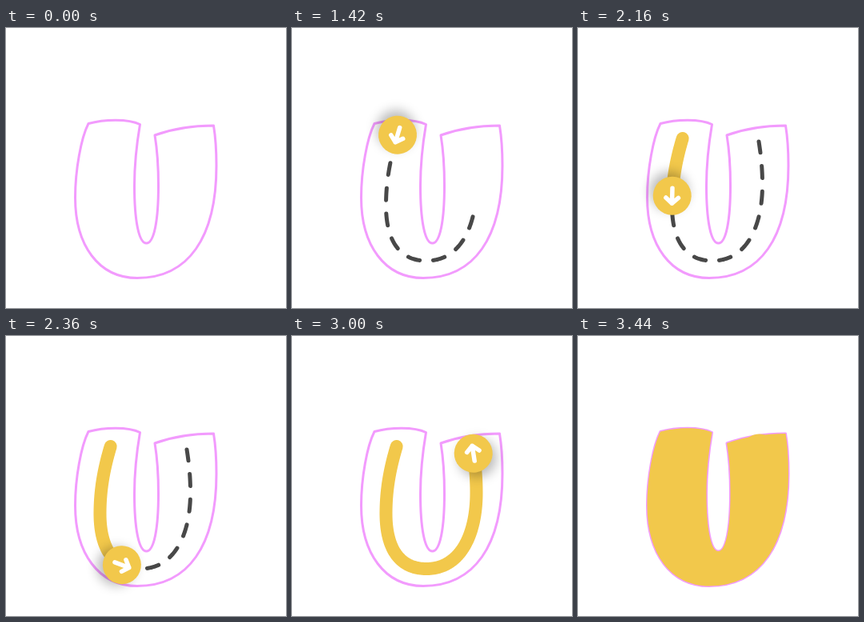
Animation of 350 by 350 pixels, one loop 4.8 s. Source, as an HTML page with a canvas:

```html
<!DOCTYPE html>
<html lang="en">
<head>
<meta charset="utf-8">
<title>Trace the letter u</title>
<style>
  html, body { margin: 0; width: 100%; height: 100%; overflow: hidden; background: #fff; }
  canvas { display: block; width: 350px; height: 350px; }
</style>
</head>
<body>
<canvas id="stage"></canvas>
<script>
const SIZE = 350, LOOP = 4800;
const PINK = '#f29bfd', GOLD = '#f2c84b', DARK = '#484848';

const canvas = document.getElementById('stage');
const ctx = canvas.getContext('2d');
const dpr = window.devicePixelRatio || 1;
canvas.width = canvas.height = SIZE * dpr;

const letter = new Path2D(
  'M103 119.5 C122 114 153 113 167.5 120.5 ' +
  'C163 147 160.5 170 160.5 197 C160.5 241 166 269 175.5 269 ' +
  'C185 269 190.5 241 190.5 197 C190.5 172 189.5 155 186 134 ' +
  'C208 126 234 122 259.5 122 C262 137 263 153 263 172 ' +
  'C263 262 228 312.5 164 312.5 C116 312.5 86.5 272 86.5 212 ' +
  'C86.5 177 94 137 103 119.5 Z');

// Centre line of the letter, measured in units of 1/366 of its length
const UNITS = 366;
const guide = document.createElementNS('http://www.w3.org/2000/svg', 'path');
guide.setAttribute('d',
  'M130.7 138 C122 167 117.5 193 117.5 222 C117.5 265 134 291 168 291 ' +
  'C210 291 230.5 249 230.5 196 C230.5 174 228.5 158 226 142');
const unit = guide.getTotalLength() / UNITS;
const points = Array.from({ length: UNITS + 1 }, (_, i) => guide.getPointAtLength(i * unit));

const clamp = (v, lo = 0, hi = 1) => Math.min(hi, Math.max(lo, v));
const progress = (t, start, span) => clamp((t - start) / span);
const ease = u => (1 - Math.cos(Math.PI * u)) / 2;

function pointAt(s) {
  const i = Math.min(Math.floor(s), UNITS - 1), f = s - i;
  const a = points[i], b = points[i + 1];
  return {
    x: a.x + (b.x - a.x) * f,
    y: a.y + (b.y - a.y) * f,
    angle: Math.atan2(b.y - a.y, b.x - a.x)
  };
}

function strokePart(from, to, width, color) {
  ctx.beginPath();
  const start = pointAt(from), end = pointAt(to);
  ctx.moveTo(start.x, start.y);
  for (let i = Math.floor(from) + 1; i < to; i++) ctx.lineTo(points[i].x, points[i].y);
  ctx.lineTo(end.x, end.y);
  ctx.lineWidth = width;
  ctx.strokeStyle = color;
  ctx.stroke();
}

function drawDashes(reach) {
  for (let s = 0; s < reach; s += 32) strokePart(s, Math.min(s + 15, reach), 5, DARK);
}

function drawBall(s, alpha, shade) {
  const p = pointAt(s), lag = 4.5;
  const turn = p.angle + Math.PI / 2;
  const cos = Math.cos(turn), sin = Math.sin(turn);
  ctx.save();
  ctx.globalAlpha = alpha;
  ctx.translate(p.x - lag * Math.cos(p.angle), p.y - lag * Math.sin(p.angle));
  ctx.rotate(turn);

  // Canvas shadows ignore rotation, so the offset is turned by hand
  ctx.shadowColor = `rgba(0,0,0,${0.27 * shade})`;
  ctx.shadowBlur = 14 * dpr;
  ctx.shadowOffsetX = (4 * cos - 6 * sin) * dpr;
  ctx.shadowOffsetY = (4 * sin + 6 * cos) * dpr;
  ctx.beginPath();
  ctx.arc(0, 0, 24, 0, Math.PI * 2);
  ctx.fillStyle = GOLD;
  ctx.fill();

  ctx.shadowColor = 'transparent';
  ctx.beginPath();
  ctx.moveTo(0, 9.5);
  ctx.lineTo(0, -9.5);
  ctx.moveTo(-7.8, -2.5);
  ctx.lineTo(0, -9.5);
  ctx.lineTo(7.8, -2.5);
  ctx.lineWidth = 5.5;
  ctx.strokeStyle = '#fff';
  ctx.stroke();
  ctx.restore();
}

function draw(t) {
  ctx.setTransform(dpr, 0, 0, dpr, 0, 0);
  ctx.fillStyle = '#fff';
  ctx.fillRect(0, 0, SIZE, SIZE);
  ctx.lineCap = ctx.lineJoin = 'round';

  ctx.lineWidth = 3;
  ctx.strokeStyle = PINK;
  ctx.stroke(letter);

  const shown = progress(t, 35, 205);
  const dashed = UNITS * ease(progress(t, 588, 1220));
  const traced = UNITS * ease(progress(t, 1782, 1240));
  const filled = progress(t, 3240, 200);

  drawDashes(dashed);
  if (traced > 0) strokePart(0, traced, 16, GOLD);
  if (shown > 0) drawBall(traced, shown, 1 - filled);

  if (filled > 0) {
    ctx.globalAlpha = filled;
    ctx.fillStyle = GOLD;
    ctx.fill(letter);
    ctx.globalAlpha = 1;
  }
}

const begin = performance.now();
function tick() {
  draw((performance.now() - begin) % LOOP);
  requestAnimationFrame(tick);
}
tick();
</script>
</body>
</html>
```
